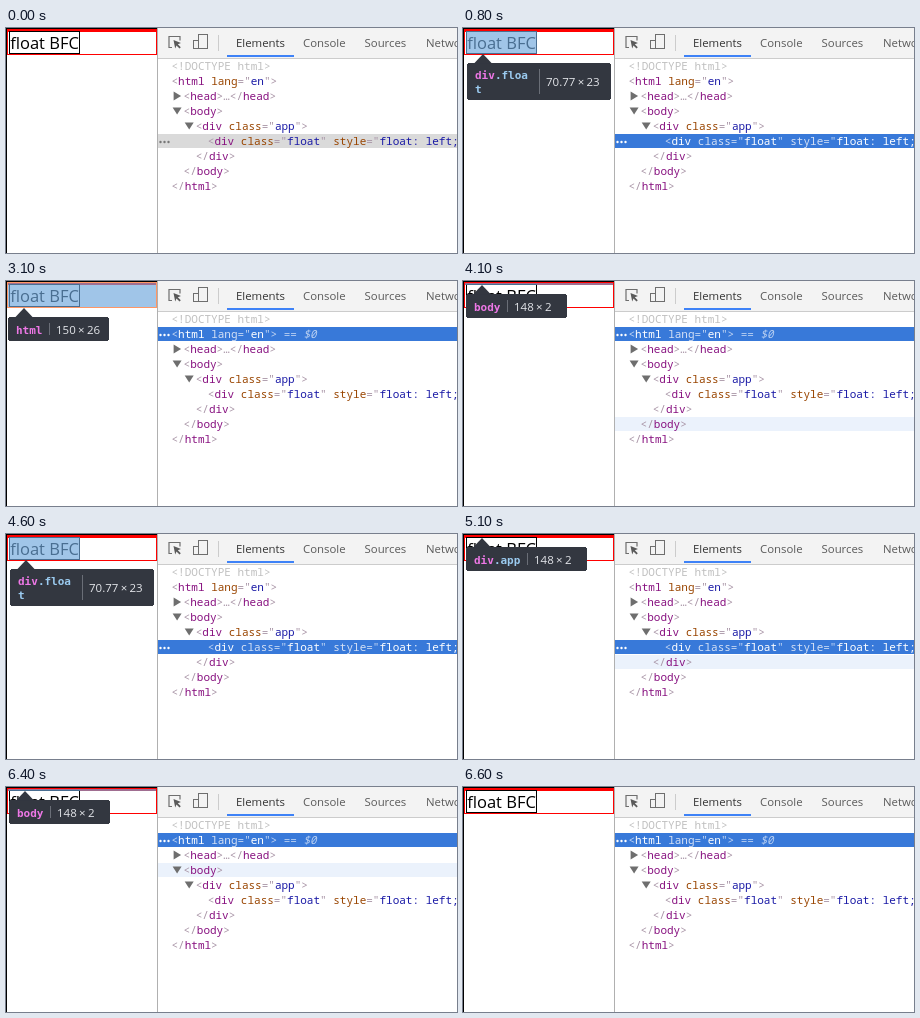
These frames come from a looping animation (451x225 px, 7 s). An HTML page:

```html
<!DOCTYPE html>
<html lang="en">
<head>
<meta charset="utf-8">
<style>
html, body { margin: 0; width: 100%; height: 100%; overflow: hidden; background: #fff; }
svg { display: block; width: 451px; height: 225px; }
text { white-space: pre; }
rect { shape-rendering: crispEdges; }
.ui { font: 11.4px "Open Sans", "Noto Sans", sans-serif; fill: #5a5a5a; }
.page { font: 16.5px "Open Sans", "Noto Sans", sans-serif; }
.code { font: 11px "Noto Sans Mono", monospace; }
.name { font: bold 11px "DejaVu Sans Mono", monospace; }
.size { font: 11.5px "Open Sans", "Noto Sans", sans-serif; fill: #e4e6ea; }
</style>
</head>
<body>
<svg id="stage" viewBox="0 0 451 225"></svg>
<script>
const LOOP = 7000;
const stage = document.getElementById('stage');

// Tree rows: indent level, arrow ('v' open, '>' closed), markup
const rows = [
  [0, '', '<!DOCTYPE html>'],
  [0, '', '<html lang="en">'],
  [1, '>', '<head>…</head>'],
  [1, 'v', '<body>'],
  [2, 'v', '<div class="app">'],
  [3, '', '<div class="float" style="float: left;">'],
  [2, '', '</div>'],
  [1, '', '</body>'],
  [0, '', '</html>'],
];

// Inspected boxes: tag, class lines, size, then x, y, width, height.
// Only html grows around the float; app and body collapse.
const html = ['html', [''], '150 × 26', 1, 1, 150, 26];
const body = ['body', [''], '148 × 2', 2, 2, 148, 2];
const app = ['div', ['.app'], '148 × 2', 2, 4, 148, 0];
const float = ['div', ['.floa', 't'], '70.77 × 23', 3, 3, 71, 23];
const boxOfRow = [, html, , body, app, float, app, body, html];

// Start time, selected row, hovered row
const steps = [
  [0, 5, -1], [100, 5, 6], [300, 5, 5], [800, 5, 5], [2500, 5, 2],
  [2900, 5, 1], [3100, 1, 1], [4100, 1, 7], [4200, 1, 5], [4600, 5, 5],
  [5000, 5, 7], [5100, 5, 6], [5200, 5, 3], [5300, 5, 2], [5400, 5, 1],
  [5700, 1, 1], [6400, 1, 3], [6500, 1, 8], [6600, 1, -1],
];

const rect = (x, y, w, h, fill, more = '') =>
  `<rect x="${x}" y="${y}" width="${w}" height="${h}" fill="${fill}" ${more}/>`;
const frame = (x, y, w, h, stroke) =>
  rect(x + .5, y + .5, w - 1, h - 1, 'none', `stroke="${stroke}"`);
const path = (d, fill, more = '') => `<path d="${d}" fill="${fill}" ${more}/>`;
const text = (kind, x, y, s, fill) =>
  `<text class="${kind}" x="${x}" y="${y}"${fill ? ` style="fill:${fill}"` : ''}>${s}</text>`;
const span = (fill, s) => `<tspan fill="${fill}">${s}</tspan>`;

// Colours: punctuation, tag, attribute name, attribute value
const plain = ['#a894a6', '#881280', '#994500', '#1a1aa6'];
const white = ['#c3d6f3', '#fff', '#d5e1f5', '#fff'];

function markup(code, [mark, tag, key, value]) {
  return code.replace(/(\w+)(=")([^"]*)|(\w+)|</g, (m, k, eq, v, word) =>
    k ? span(key, k) + eq + span(value, v) : word ? span(tag, word) : '&lt;');
}

function row([level, arrow, code], i, selected, hovered, focused) {
  const top = 31 + 15 * i, x = 165.5 + 12.1 * level, lit = selected && focused;
  let out = '';
  if (selected) {
    out += rect(152, top, 299, 14, focused ? '#3879d9' : '#dadada');
    for (const dx of [154.5, 158.5, 162.5])
      out += `<circle cx="${dx}" cy="${top + 8}" r="1.2" fill="${lit ? '#fff' : '#777'}"/>`;
  } else if (hovered) out += rect(152, top, 299, 14, '#ebf2fc');
  if (arrow) out += path(arrow === 'v'
    ? `M${x - 11} ${top + 3.5}h9l-4.5 7z` : `M${x - 10} ${top + 2.5}v9l7.5-4.5z`, '#6e6e6e');
  const colors = lit ? white : i ? plain : Array(4).fill('#c0c0c0');
  out += text('code', x, top + 11, markup(code, colors), colors[0]);
  if (lit) out += `<text class="code" x="${x + 6.6 * (code.length + 1)}" y="${top + 11}" ` +
    `fill="#b9d0f2">== <tspan font-style="italic">$0</tspan></text>`;
  return out;
}

function toolbar() {
  const cursor = 'M167.500 12l7.500 3-3.2 1.2 3 3-1.3 1.3-3-3-1.3 3z';
  return rect(152, 0, 299, 30, '#f3f3f3') + rect(152, 30, 299, 1, '#ccc') +
    path('M166 19.500h-3v-11h11v4', 'none', 'stroke="#6e6e6e" stroke-width="1.2"') +
    path(cursor, '#5a5a5a') +
    frame(192, 6, 10, 15, '#6e6e6e') + frame(187, 12, 6, 9, '#6e6e6e') +
    rect(212, 7, 1, 16, '#ccc') +
    text('ui', 230, 19, 'Elements', '#333') + text('ui', 297, 19, 'Console') +
    text('ui', 358.5, 19, 'Sources') + text('ui', 420, 19, 'Network') +
    rect(221, 27, 67, 2, '#3e82f7');
}

const page = () =>
  rect(0, 0, 151, 225, '#fff') + rect(0, 0, 1, 225, '#000') + rect(0, 0, 151, 1, '#000') +
  frame(1, 1, 150, 26, '#f00') + rect(2, 2, 148, 2, '#f00') +
  frame(3, 3, 71, 23, '#000') + text('page', 4.2, 20.5, 'float BFC', '#000');

function highlight([tag, lines, size, x, y, w, h]) {
  const left = x + 1, tip = y + h, top = tip + 9;
  const tall = lines.length > 1, height = tall ? 37 : 24;
  const chars = (tag + lines[0]).length * 6.62;
  const bar = Math.round(left + (tall ? 19 : 14.5) + chars);
  const right = bar + (tall ? 72 : 60);
  const base = top + (tall ? 16 : 17);
  let out = rect(x, y, w, h, '#6fa8dc', 'opacity=".66"');
  if (tag === 'html') out += frame(x, y, w, h, '#ff9765');
  out += rect(left, top, right - left, height, '#333740', 'rx="2.5"') +
    path(`M${left + 7} ${top + .5}L${left + 16} ${tip}l9 ${top + .5 - tip}z`, '#333740') +
    rect(bar, top + 6, 1, height - 12, '#6a6e77') +
    text('name', left + 8, base, span('#ee78e6', tag) + lines[0], '#9bcbf0') +
    text('size', bar + 7, top + height / 2 + 4.5, size.replace(/ /g, '\u2009'));
  if (tall) out += text('name', left + 8, base + 14, lines[1], '#9bcbf0');
  return out;
}

let shown;
const begin = performance.now();
function draw() {
  const t = (performance.now() - begin) % LOOP;
  const step = steps.findLast(s => s[0] <= t);
  if (step !== shown) {
    shown = step;
    const [start, selected, hovered] = step;
    const box = boxOfRow[hovered];
    stage.innerHTML = page() + (box ? highlight(box) : '') +
      rect(152, 31, 299, 194, '#fff') + toolbar() +
      rows.map((r, i) => row(r, i, i === selected, i === hovered, start >= 800)).join('') +
      rect(151, 0, 1, 225, '#b0b0b0');
  }
  requestAnimationFrame(draw);
}
draw();
</script>
</body>
</html>
```
